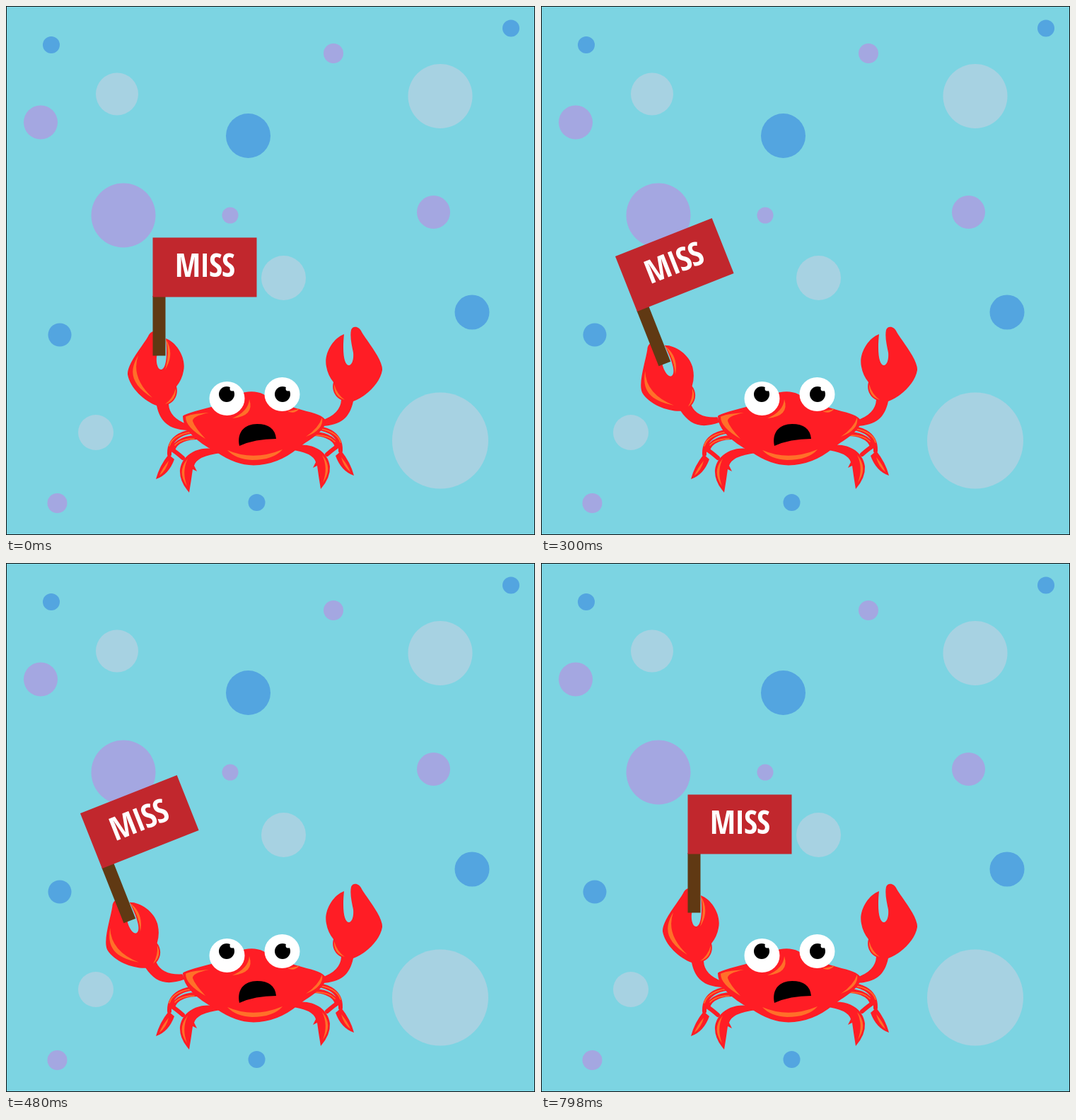
An HTML page that plays this animation: 748x748 px, repeating every 930 ms.

```html
<!DOCTYPE html>
<html lang="en">
<head>
<meta charset="utf-8">
<title>Crab with a flag</title>
<style>
  html, body { margin: 0; height: 100%; overflow: hidden; background: #7cd4e2; }
  svg { display: block; width: 100vw; height: 100vh; }
  .red { fill: #ff1d25; }
  .glow { fill: #ff7029; }
  .limb { fill: none; stroke: #ff1d25; stroke-width: 6; stroke-linecap: round; }
  .shine { fill: none; stroke: #ff7029; stroke-width: 1.6; stroke-linecap: round; }
  text { font: bold 46px "Open Sans Condensed", "Open Sans", "Noto Sans", sans-serif; font-stretch: condensed; letter-spacing: -1px; fill: #fff; text-anchor: middle; }
</style>
</head>
<body>
<svg viewBox="0 0 748 748">
  <g fill="#53a5e0">
    <circle cx="64" cy="55" r="12"/>
    <circle cx="714" cy="31.5" r="12"/>
    <circle cx="342.5" cy="183.5" r="31.5"/>
    <circle cx="76" cy="465" r="16.5"/>
    <circle cx="659" cy="433" r="24.5"/>
    <circle cx="354.5" cy="702" r="12"/>
  </g>
  <g fill="#a4a7e1">
    <circle cx="463" cy="67" r="14"/>
    <circle cx="49" cy="164.5" r="24"/>
    <circle cx="166" cy="296" r="45.5"/>
    <circle cx="317" cy="296" r="11.5"/>
    <circle cx="604.5" cy="291.5" r="23.5"/>
    <circle cx="72.5" cy="703" r="14"/>
  </g>
  <g fill="#a7d2e2">
    <circle cx="157" cy="124.5" r="30"/>
    <circle cx="614" cy="127.5" r="45.5"/>
    <circle cx="392.5" cy="384.5" r="31.5"/>
    <circle cx="127" cy="603" r="25"/>
    <circle cx="614" cy="614.5" r="68"/>
  </g>

  <g id="legs">
    <path class="limb" d="M278 601C254 600 230 608 231 634M282 611C256 607 239 616 236 628Q242 632 250 639"/>
    <path class="shine" d="M268 602C248 603 234 611 231 622M266 612Q247 612 239 621"/>
    <path class="red" d="M230 634Q217 650 212 669Q230 663 238 641Z"/>
    <path class="glow" d="M230 643Q220 655 217 664Q227 656 230 643Z"/>
    <path class="red" d="M302 628C276 620 249 632 246 656Q245 672 259 688Q262 670 264 655L270 658L266 650Q270 636 304 632Z"/>
    <path class="glow" d="M257 640Q241 658 256 679Q248 658 257 640Z"/>
  </g>
  <use href="#legs" transform="translate(704 -5) scale(-1 1)"/>

  <g id="claw">
    <path class="red" d="M478 464C462 470 449 492 453 510Q455 522 463 532C460 542 465 553 474 557Q473 577 446 586L446 594C474 593 486 582 491 559C508 553 529 534 532 515C533 500 511 475 503 461C499 452 490 452 488 458C486 468 489 480 491 490C492 500 489 508 485 508C479 508 475 494 478 464Z"/>
    <path class="glow" d="M464 535Q463 552 479 557Q468 549 464 535Z"/>
  </g>

  <!-- left arm: the same claw mirrored, holding the flag -->
  <g id="arm">
    <use href="#claw" transform="translate(704 6) scale(-1 1)"/>
    <path class="glow" d="M187 494C173 517 177 535 207 554Q176 525 187 494Z"/>
    <path class="glow" d="M226 471Q239 492 225 514Q232 492 226 471Z"/>
    <rect x="207.5" y="410" width="18" height="84.5" fill="#603913"/>
    <rect x="207.5" y="327.5" width="147" height="84" fill="#c1272d"/>
    <text x="281" y="382.5">MISS</text>
  </g>

  <!-- body -->
  <path class="red" d="M250 580Q252 576 310 562C325 546 348 541 364 549Q390 564 425 573Q452 579 452 588C450 603 427 614 412 626Q384 649 350 649.500Q324 649 298 631C280 622 250 603 250 580Z"/>
  <path class="glow" d="M254 581Q259 577 287 575Q263 580 264 587Q267 596 282 612Q254 596 254 581Z"/>
  <path class="glow" d="M447 582Q450 599 424 609Q442 597 447 582Z"/>
  <path class="glow" d="M344 556Q352 580 320 583Q343 573 344 556Z"/>
  <path class="glow" d="M398 573Q408 578 415 569Q408 572 398 573Z"/>
  <path class="glow" d="M313 628Q350 644 391 627Q378 642 348 642Q325 641 313 628Z"/>
  <path d="M330 622C326 602 338 591 355 591Q380 591 382 612Q352 612 330 622Z"/>

  <g fill="#fff">
    <ellipse cx="312.5" cy="555" rx="25" ry="24"/>
    <ellipse cx="390.5" cy="549" rx="25" ry="24"/>
  </g>
  <g id="pupil">
    <circle cx="312" cy="549" r="11"/>
    <circle cx="320" cy="541" r="3.5" fill="#fff"/>
  </g>
  <use href="#pupil" x="79"/>

  <rect x=".5" y=".5" width="747" height="747" fill="none" stroke="#111"/>
</svg>
<script>
  const arm = document.getElementById("arm");
  const tilted = "translate(105 354) rotate(-21.6) translate(-207.5 -327.5)";

  function draw() {
    const t = performance.now() % 930;
    arm.setAttribute("transform", t >= 300 && t < 600 ? tilted : "");
    requestAnimationFrame(draw);
  }
  draw();
</script>
</body>
</html>
```
